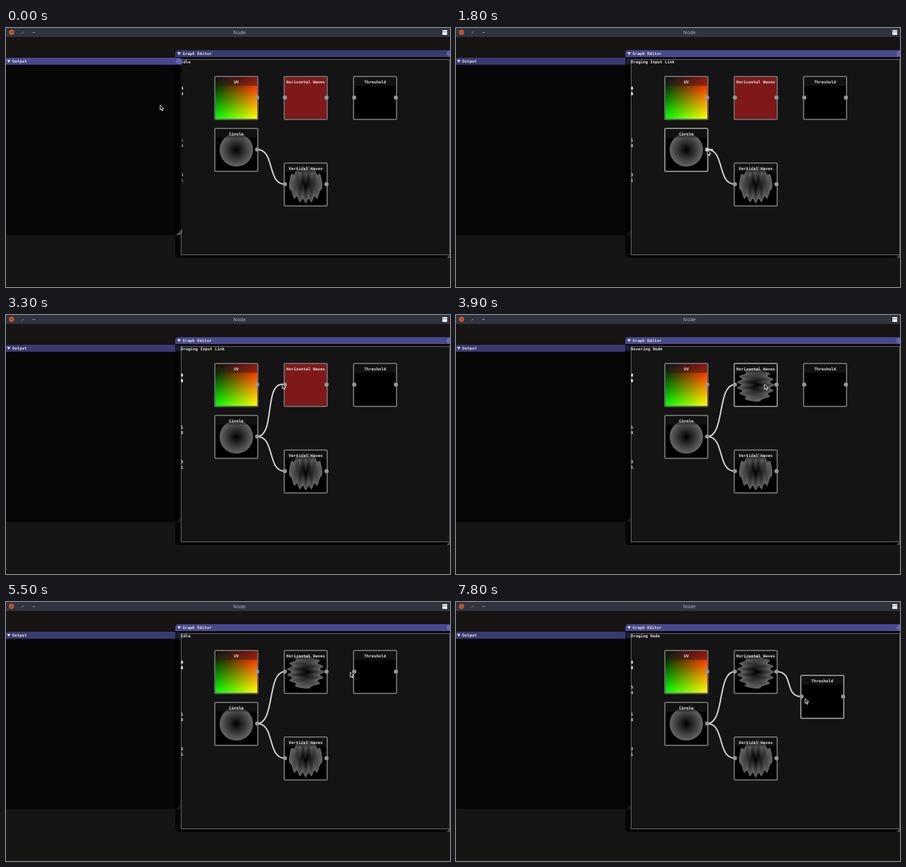
Recreate the animation shown at these times as an HTML page with a canvas. Size 640x374 px, loop 8000 ms.

```html
<!DOCTYPE html>
<html lang="en">
<head>
<meta charset="utf-8">
<title>Node</title>
<style>
html, body { margin: 0; height: 100%; overflow: hidden; background: #161513; }
canvas { display: block; }
</style>
</head>
<body>
<canvas id="stage" width="640" height="374"></canvas>
<script>
const g = document.getElementById('stage').getContext('2d');
const LOOP = 8000, STEP = 100, IMG = 60, SIZE = 62;
const MONO = 'bold 5.82px "DejaVu Sans Mono", monospace';
const INK = '#dedede';

// Cursor moves: start time, number of steps, x, y reached
const moves = [
  [0, 1, 222, 111], [400, 9, 372, 178], [1300, 2, 362, 176],
  [2000, 5, 387, 134], [2800, 6, 398, 99], [3600, 5, 456, 100],
  [4200, 4, 460, 100], [4600, 1, 464, 101], [4800, 1, 466, 101],
  [5300, 3, 496, 101], [5700, 2, 464, 101], [6000, 1, 461, 100],
  [6100, 1, 464, 100], [6300, 3, 500, 99], [6700, 1, 502, 97],
  [7400, 1, 518, 101], [7500, 1, 507, 103], [7700, 2, 503, 139]
];
// Mouse actions
const FOCUS = 1800, DROP_CIRCLE = 3600, PULL_WAVES = 6300, DROP_WAVES = 7100, CARRY = 7700;

function cursorAt(t) {
  let x = 0, y = 0;
  for (const [start, steps, toX, toY] of moves) {
    if (t < start) break;
    const k = Math.min(1, ((t - start) / STEP + 1) / steps);
    x += (toX - x) * k;
    y += (toY - y) * k;
  }
  return { x, y };
}

// A square picture from a colour formula over u, v in 0..1
function shade(color) {
  const c = document.createElement('canvas');
  c.width = c.height = IMG;
  const ctx = c.getContext('2d'), img = ctx.createImageData(IMG, IMG);
  for (let i = 0; i < IMG * IMG; i++) {
    const u = (i % IMG + .5) / IMG, v = (Math.floor(i / IMG) + .5) / IMG;
    img.data.set([...color(u, v), 255], i * 4);
  }
  ctx.putImageData(img, 0, 0);
  return c;
}
function disc(u, v) {
  const d = Math.hypot(u - .5, v - .5);
  const k = 255 * d * Math.min(1, Math.max(0, (.4 - d) * IMG + .5));
  return [k, k, k];
}
const wave = a => .05 * Math.cos(45 * (a - .5));
const pics = {
  uv: shade((u, v) => [255 * u, 255 * v, 0]),
  circle: shade(disc),
  vertical: shade((u, v) => disc(u, v - wave(u))),
  horizontal: shade((u, v) => disc(u - wave(v), v)),
  red: shade(() => [127, 25, 25]),
  black: shade(() => [0, 0, 0])
};

function text(s, x, y, align = 'left', font = MONO, color = INK) {
  g.font = font;
  g.textAlign = align;
  g.fillStyle = color;
  g.fillText(s, x, y);
}
function shape(color, points) {
  g.fillStyle = color;
  g.beginPath();
  points.forEach(p => g.lineTo(...p));
  g.closePath();
  g.fill();
}
function rect(x, y, w, h, color, radii = 0) {
  g.fillStyle = color;
  g.beginPath();
  g.roundRect(x, y, w, h, radii);
  g.fill();
}
function dot(x, y, r, color) {
  g.fillStyle = color;
  g.beginPath();
  g.arc(x, y, r, 0, 7);
  g.fill();
}
function line(x0, y0, x1, y1, color) {
  g.strokeStyle = color;
  g.lineWidth = .8;
  g.beginPath();
  g.moveTo(x0, y0);
  g.lineTo(x1, y1);
  g.stroke();
}

function desktop() {
  rect(0, 0, 640, 374, '#161513');
  rect(0, 0, 640, 13, '#2f343f');
  text('Node', 336.5, 9, 'center', '7px "Noto Sans", sans-serif', '#b4b8c0');
  dot(8, 6.3, 3.7, '#cf5a30');
  line(6.7, 5, 9.3, 7.6, '#5a2a28');
  line(9.3, 5, 6.7, 7.6, '#5a2a28');
  line(22.5, 8, 25.5, 5, '#a9adb5');
  line(38.2, 6.5, 41.8, 6.5, '#a9adb5');
  rect(629, 3, 7, 7, '#f0f0f0');
  rect(629, 5, 7, 1, '#8a8d94');
}

function panel(title, x, y, w, h, active) {
  const r = x + w, b = y + h;
  rect(x, y, w, h, 'rgba(0,0,0,.7)', 4.5);
  rect(x, y, w, 10, active ? 'rgba(82,82,161,.87)' : 'rgba(69,69,138,.83)', [4.5, 4.5, 0, 0]);
  shape(INK, [[x + 3, y + 3], [x + 8, y + 3], [x + 5.5, y + 7.2]]);
  text(title, x + 10.5, y + 7.2);
  dot(r - 5, y + 5, 4, 'rgba(128,128,230,.5)');
  shape('rgba(255,255,255,.3)', [[r, b - 9], [r, b - 3], [r - 3, b], [r - 9, b]]);
}

const near = (p, x, y) => Math.hypot(p.x - x, p.y - y) < 3.5;

class Node {
  constructor(name, col, row, pic, digits, hasInput = true) {
    Object.assign(this, { name, pic, digits, hasInput, x: 301 + 100 * col, y: 70 + 25 * row });
  }
  get output() { return { x: this.x + 61, y: this.y + 30.5 }; }
  get input() { return { x: this.x + 1, y: this.y + 30.5 }; }
  get slots() { return this.hasInput ? [this.input, this.output] : [this.output]; }
  holds(p) {
    return p.x >= this.x && p.x <= this.x + SIZE && p.y >= this.y && p.y <= this.y + SIZE;
  }
  draw(p) {
    const { x, y } = this;
    text(this.digits[0], 252, y + 18.8);
    text(this.digits[1], 252, y + 27.1);
    g.drawImage(pics[this.pic], Math.round(x + 1), Math.round(y + 1));
    if (this.pic !== 'red') rect(x + 1, y + 1, IMG, 12.5, 'rgba(34,34,34,.5)');
    g.strokeStyle = this.holds(p) ? '#838383' : '#646464';
    g.lineWidth = 2;
    g.beginPath();
    g.roundRect(x, y, SIZE, SIZE, 1.5);
    g.stroke();
    text(this.name, x + 31, y + 10, 'center');
    this.slots.forEach(s => dot(s.x, s.y, 3, near(p, s.x, s.y) ? '#c8c8c8' : '#969696'));
  }
}

function link(a, b) {
  g.strokeStyle = '#d2d2d2';
  g.lineWidth = 2;
  g.beginPath();
  g.moveTo(a.x, a.y);
  g.bezierCurveTo(a.x + 26, a.y, b.x - 26, b.y, b.x, b.y);
  g.stroke();
}

function editor(t, cursor, active) {
  panel('Graph Editor', 244, 32, 400, 300, active);
  rect(252, 45, 388, 283, '#141414');
  g.strokeStyle = '#686868';
  g.lineWidth = 1;
  g.strokeRect(252.5, 45.5, 387, 282);

  const carried = t >= CARRY;
  const uv = new Node('UV', 0, 0, 'uv', '48', false);
  const circle = new Node('Circle', 0, 3, 'circle', '18', false);
  const vertical = new Node('Vertical Waves', 1, 5, 'vertical', '31');
  const horizontal = new Node('Horizontal Waves', 1, 0, t < DROP_CIRCLE ? 'red' : 'horizontal', '88');
  const threshold = new Node('Threshold', 2, 0, 'black', carried ? '54' : '48');
  const nodes = [uv, circle, vertical, horizontal, threshold];
  if (carried) {
    const grip = cursorAt(CARRY - STEP);
    threshold.x += cursor.x - grip.x;
    threshold.y += cursor.y - grip.y;
  }

  let pulled = null;
  if (t >= FOCUS && t < DROP_CIRCLE) pulled = circle;
  if (t >= PULL_WAVES && t < DROP_WAVES) pulled = horizontal;

  link(circle.output, vertical.input);
  if (t >= DROP_CIRCLE) link(circle.output, horizontal.input);
  if (t >= DROP_WAVES) link(horizontal.output, threshold.input);
  if (pulled) link(pulled.output, { x: cursor.x, y: cursor.y + 1 });
  nodes.forEach(n => n.draw(cursor));

  let status = 'Idle';
  if (carried) status = 'Draging Node';
  else if (pulled) status = 'Draging Input Link';
  else if (nodes.some(n => n.holds(cursor))) status = 'Hovering Node';
  else if (nodes.some(n => n.slots.some(s => near(cursor, s.x, s.y)))) status = 'Hovering Input';
  text(status, 252, 51.2);
}

function pointer({ x, y }) {
  g.save();
  g.translate(x + .2, y + .4);
  shape('#000', [[0, 0], [0, 7], [1.7, 5.5], [2.8, 8.3], [4, 7.8], [3, 5.2], [5.2, 5]]);
  g.strokeStyle = '#f4f4f4';
  g.lineWidth = .9;
  g.stroke();
  g.restore();
}

function draw(t) {
  const cursor = cursorAt(t), editing = t >= FOCUS;
  const output = () => panel('Output', -1.5, 43, 255.5, 256, !editing);
  const graph = () => editor(t, cursor, editing);
  desktop();
  (editing ? [output, graph] : [graph, output]).forEach(paint => paint());
  pointer(cursor);
}

const start = performance.now();
function tick() {
  const t = (performance.now() - start) % LOOP;
  draw(Math.floor(t / STEP) * STEP);
  requestAnimationFrame(tick);
}
tick();
</script>
</body>
</html>
```
